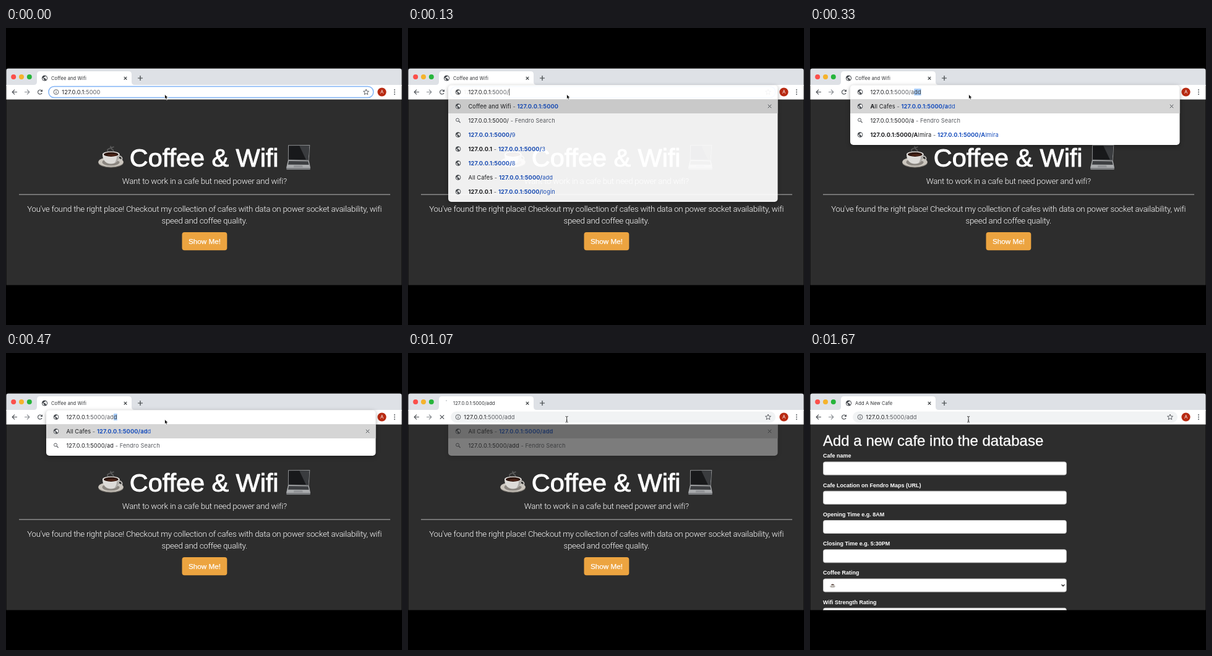
Write an HTML page with a canvas that moves like this. It is 640 px wide and 480 px high and loops after 1730 ms.

```html
<!DOCTYPE html>
<html lang="en">
<head>
<meta charset="utf-8">
<title>Coffee and Wifi</title>
<style>
html, body { margin: 0; width: 100%; height: 100%; overflow: hidden; background: #000; }
canvas { display: block; }
</style>
</head>
<body>
<canvas id="stage" width="640" height="480"></canvas>
<script>
const LOOP = 1730;
const UI = 'Inter, Roboto, sans-serif';
const PAGE = '"Liberation Sans", Arial, sans-serif';
const THIN = 'Roboto, "Liberation Sans", sans-serif';
const INK = '#1b1c1f', GRAY = '#585b60', BLUE = '#1a50bd', DARK = '#2d2d2d';

const main = document.getElementById('stage').getContext('2d');
const layer = document.createElement('canvas');
layer.width = 640;
layer.height = 480;
const over = layer.getContext('2d');
let c = main;

// ---- helpers ----
function box(x, y, w, h, r, fill, stroke, lw = 1) {
  c.beginPath();
  c.roundRect(x, y, w, h, r);
  if (fill) { c.fillStyle = fill; c.fill(); }
  if (stroke) { c.strokeStyle = stroke; c.lineWidth = lw; c.stroke(); }
}
function oval(x, y, rx, ry, fill, stroke, lw = 1) {
  c.beginPath();
  c.ellipse(x, y, rx, ry, 0, 0, 7);
  if (fill) { c.fillStyle = fill; c.fill(); }
  if (stroke) { c.strokeStyle = stroke; c.lineWidth = lw; c.stroke(); }
}
function poly(fill, ...p) {
  c.beginPath();
  for (let i = 0; i < p.length; i += 2) c.lineTo(p[i], p[i + 1]);
  c.closePath();
  c.fillStyle = fill;
  c.fill();
}
function path(d, x, y, stroke, lw = 1, fill) {
  const p = new Path2D(d);
  c.save();
  c.translate(x, y);
  if (fill) { c.fillStyle = fill; c.fill(p); }
  if (stroke) { c.strokeStyle = stroke; c.lineWidth = lw; c.stroke(p); }
  c.restore();
}
function text(s, x, y, font, color, align = 'left', track = 0, bolder = 0) {
  c.font = font;
  c.fillStyle = color;
  c.textAlign = align;
  c.letterSpacing = track + 'px';
  c.fillText(s, x, y);
  if (bolder) {
    c.strokeStyle = color;
    c.lineWidth = bolder;
    c.lineJoin = 'round';
    c.strokeText(s, x, y);
  }
  const w = c.measureText(s).width;
  c.letterSpacing = '0px';
  return w;
}
// Consecutive pieces: [string, color, weight]
function runs(list, x, y) {
  for (const [s, color, weight = 400] of list)
    x += text(s, x, y, `${weight} 9.2px ${UI}`, color, 'left', .12);
  return x;
}
const cross = (x, y, r, lw, color) =>
  path(`M${-r} ${-r}L${r} ${r}M${r} ${-r}L${-r} ${r}`, x, y, color, lw);

// ---- icons ----
function globe(x, y, r) {
  oval(x, y, r, r, '#43474c');
  c.save();
  c.translate(x, y);
  c.scale(r / 10, r / 10);
  path('M-1 8C-5 7.5 -8 4 -8 0L-7.8 -1.8L-3 3V4Q-3 6 -1 6Z', 0, 0, null, 0, '#fff');
  path('M6 5.4Q5.4 4 4 4H3V1Q3 0 2 0H-4V-2H-2Q-1 -2 -1 -3V-5H1Q3 -5 3 -7.4Q8 -5 8 0Q8 3.2 6 5.4Z', 0, 0, null, 0, '#fff');
  c.restore();
}
function lens(x, y) {
  oval(x - 1, y - 1, 2.5, 2.5, null, GRAY);
  path('M1 1L3.6 3.6', x, y, GRAY, 1.2);
}
function arrow(x, y, dir, color) {
  path(`M${4 * dir} 0H${-3.6 * dir}M0 -3.8L${-3.8 * dir} 0L0 3.8`, x, y, color, 1.2);
}
function reload(x, y) {
  c.beginPath();
  c.arc(x, y, 3.4, 0.5, 5.5);
  c.strokeStyle = '#4d5156';
  c.lineWidth = 1.2;
  c.stroke();
  poly('#4d5156', x + 4, y - 4.2, x + 4, y - .4, x + .3, y - .4);
}
function star(x, y) {
  c.beginPath();
  for (let i = 0; i < 10; i++) {
    const a = i * Math.PI / 5 - Math.PI / 2, r = i % 2 ? 2.1 : 4.7;
    c.lineTo(x + r * Math.cos(a), y + r * Math.sin(a));
  }
  c.closePath();
  c.strokeStyle = '#4d5156';
  c.lineWidth = .9;
  c.stroke();
}
function cup(x, y, k) {
  c.save();
  c.translate(x, y);
  c.scale(k, k);
  oval(0, 7.5, 20.3, 8.3, '#85807a');
  oval(0, 6.5, 20.2, 7.8, '#cbc6be');
  oval(0, 7, 14, 5.5, '#8b8680');
  oval(14, 1, 4, 3.8, null, '#c8c5c0', 1.8);
  path('M-13.5 -6C-13.5 4 -8 9.5 0 9.5C8 9.5 14 4 14 -6Z', 0, 0, null, 0, '#dddbd8');
  path('M6 8C11 6 14 1 14 -6L9.5 -3C9.5 2 8 5 6 8Z', 0, 0, null, 0, '#aeaba7');
  oval(.3, -6, 13.7, 4.6, '#efedea');
  oval(.3, -5.7, 12, 3.6, '#2e1710');
  oval(2, -4.6, 7.5, 1.7, '#4d2518');
  path('M-4 -10Q-8 -13 -3 -15T-1 -19M2 -9Q6 -12 2 -14T5 -18', 0, 0, 'rgba(140,140,140,.5)', 1.6);
  c.restore();
}
function laptop() {
  poly('#8f9193', 456, 189.3, 491.3, 189, 489.6, 214.5, 455.8, 214);
  poly('#18191b', 457, 190.3, 490.2, 190, 488.6, 213.3, 456.8, 212.8);
  poly('#3a3c3f', 474, 190.1, 490.2, 190, 488.6, 213.3, 485, 213.2);
  poly('#a9abad', 455.8, 214, 489.6, 214.5, 492, 226, 453, 226);
  poly('#3d3f42', 457, 215, 488.3, 215.4, 489.6, 221, 455.8, 220.8);
  poly('#929497', 465.5, 222, 479, 222, 479.8, 225.3, 464.8, 225.3);
  poly('#7d7f82', 453, 226, 492, 226, 491.5, 229, 453.5, 229);
}

// ---- pages ----
function home() {
  cup(169.5, 210, 1);
  text('Coffee & Wifi', 199.8, 224.4, `41.4px ${PAGE}`, '#fff', 'left', 0, 1);
  laptop();
  const lead = (s, y) => text(s, 320.7, y, `300 13.3px ${THIN}`, '#fff', 'center', -.24);
  lead('Want to work in a cafe but need power and wifi?', 251.5);
  c.fillStyle = '#b8b8b8';
  c.fillRect(21, 268.6, 600, 1);
  lead("You've found the right place! Checkout my collection of cafes with data on power socket availability, wifi", 297);
  lead('speed and coffee quality.', 316.3);
  box(284.5, 330, 72.8, 29.2, 4, '#eca440');
  text('Show Me!', 321, 348.7, `11.7px ${PAGE}`, '#fff', 'center', 0, .25);
}
function form() {
  text('Add a new cafe into the database', 21, 149.8, `24px ${PAGE}`, '#fff', 'left', 0, .3);
  const labels = ['Cafe name', 'Cafe Location on Fendro Maps (URL)', 'Opening Time e.g. 8AM',
    'Closing Time e.g. 5:30PM', 'Coffee Rating', 'Wifi Strength Rating'];
  labels.forEach((s, i) => {
    const y = 47.25 * i;
    text(s, 21, 169.3 + y, `bold 9px ${PAGE}`, '#fff');
    box(21.5, 176 + y, 392.8, 21, 3, '#fff', '#c4c4c4');
  });
  cup(36.5, 375.7, .2);
  path('M-2.4 -1.2L0 1.3L2.4 -1.2', 409, 375.5, '#222', 1.3);
}

// ---- browser ----
function chrome(s) {
  box(0, 65.5, 640, 28, [4, 4, 0, 0], '#dee1e6');
  c.fillStyle = '#fff';
  c.fillRect(0, 92, 640, 23.5);
  [['#fb4f4a', 12.2], ['#f5b32c', 25], ['#27b53b', 37.8]].forEach(([col, x]) => oval(x, 79, 4, 4, col));
  path('M45 92Q50 92 50 87V75Q50 70 55 70H198Q203 70 203 75V87Q203 92 208 92Z', 0, 0, null, 0, '#fff');
  if (s.loading) oval(62, 77, .8, .8, '#9aa0a6');
  else globe(62.5, 81, 4.6);
  text(s.tab, 73, 83.7, `7.5px ${UI}`, '#2c2e31', 'left', .12);
  cross(193, 81.2, 2.3, 1.1, '#3c4043');
  path('M-4 0H4M0 -4V4', 217, 81, '#3c4043', 1.2);

  arrow(14, 103.5, 1, '#4d5156');
  arrow(34, 103.5, -1, '#8a8e93');
  if (s.loading) cross(55, 103.5, 3.2, 1.2, '#4d5156');
  else reload(55, 103.5);
  if (s.focus) box(68.9, 94.4, 524.9, 18.2, 9, '#fff', '#7fb2f5', 1.5);
  else box(69, 94.5, 525, 18, 9, '#f1f3f4');
  oval(81, 103.5, 3.9, 3.9, null, '#4d5156', .9);
  path('M0 -.5V2.1M0 -2.1V-1.1', 81, 103.5, '#4d5156', 1);
  runs([['127.0.0.1', INK], [':5000' + s.path, GRAY]], 90.3, 106.8);
  star(582, 103.7);
  oval(607.5, 103.5, 7.1, 7.1, '#b82a12');
  text('A', 607.5, 106.3, `7.6px ${UI}`, '#fff', 'center');
  [100, 103.5, 107].forEach(y => oval(628, y, .95, .95, '#4d5156'));
}

// ---- suggestions ----
const HOST = '127.0.0.1', BASE = HOST + ':5000/';
const dash = [' - ', GRAY];
const link = (bold, rest = '') => [[bold, BLUE, 700], [rest, BLUE]];
const search = q => ({ find: true, list: [[BASE + q, INK], [' - Fendro Search', GRAY]] });
const row = (...list) => ({ list });

const ROOT = [
  row(['Coffee and Wifi', INK], dash, ...link(HOST + ':5000')),
  search(''),
  row(...link(BASE, '9')),
  row([HOST, INK, 700], dash, ...link(BASE, '3')),
  row(...link(BASE, '8')),
  row(['All Cafes', INK], dash, ...link(BASE, 'add')),
  row([HOST, INK, 700], dash, ...link(BASE, 'login'))
];
const ONE = [
  row(['A', INK, 700], ['ll Cafes', INK], dash, ...link(BASE + 'a', 'dd')),
  search('a'),
  row([BASE + 'A', INK, 700], ['lmira', INK], dash, ...link(BASE + 'A', 'lmira'))
];
const TWO = [row(['All Cafes', INK], dash, ...link(BASE + 'ad', 'd')), search('ad')];
const FULL = [row(['All Cafes', INK], dash, ...link(BASE + 'add')), search('add')];

function popup({ rows, typed = '', hint = '', alpha = 1, closing }) {
  c = over;
  c.clearRect(0, 0, 640, 480);
  c.save();
  c.shadowColor = 'rgba(0,0,0,.35)';
  c.shadowBlur = 7;
  c.shadowOffsetY = 2;
  box(65, 92.5, 532.5, 27.5 + 23 * rows.length, 5, '#fff');
  c.restore();
  globe(81, 103.5, 4.3);
  let x = runs([[HOST, INK], [':5000/' + typed, GRAY]], 97.5, 106.8);
  if (hint) {
    c.fillStyle = '#a6cbf8';
    c.fillRect(x, 98, c.measureText(hint).width, 11);
    runs([[hint, '#3c4043']], x, 106.8);
  } else {
    c.fillStyle = '#222';
    c.fillRect(x + .3, 98, .8, 11);
  }
  c.fillStyle = '#d5d5d5';
  c.fillRect(65, 115, 532.5, 23);
  rows.forEach((r, i) => {
    const y = 126.5 + 23 * i;
    if (r.find) lens(81, y);
    else globe(81, y, 4.3);
    runs(r.list, 97.5, y + 3.2);
  });
  cross(584.5, 126.5, 2.7, 1, '#4d5156');

  c = main;
  c.save();
  if (closing) {
    c.beginPath();
    c.rect(0, 115.5, 640, 300);
    c.clip();
  }
  c.globalAlpha = alpha;
  c.drawImage(layer, 0, 0);
  c.restore();
}

// ---- pointers ----
function pointer() {
  path('M0 0V8L1.9 6.4L3.1 9.2L4.6 8.5L3.4 5.8H5.8Z', 256.4, 107, '#fff', .9, '#111');
}
function beam(x) {
  path('M-2 -4.7Q0 -4.7 0 -3.6Q0 -4.7 2 -4.7M0 -3.8V3.8M-2 4.7Q0 4.7 0 3.6Q0 4.7 2 4.7M-1 1.6H1', x, 107.2, '#222', .9);
}

// ---- timeline ----
const start = { tab: 'Coffee and Wifi', path: '', focus: true, page: home };
const added = { tab: 'Add A New Cafe', path: '/add', page: form, beam: 256.6 };
const STEPS = [
  [0, start],
  [70, { ...start, pop: { rows: ROOT, alpha: .5 } }],
  [130, { ...start, pop: { rows: ROOT, alpha: .93 } }],
  [200, { ...start, pop: { rows: ROOT } }],
  [330, { ...start, pop: { rows: ONE, typed: 'a', hint: 'dd' } }],
  [470, { ...start, pop: { rows: TWO, typed: 'ad', hint: 'd' } }],
  [600, { ...start, pop: { rows: FULL, typed: 'add' } }],
  [1070, { tab: BASE + 'add', path: '/add', page: home, loading: true, beam: 256.6,
    pop: { rows: FULL, typed: 'add', alpha: .38, closing: true } }],
  [1130, added],
  [1670, { ...added, beam: 256.1 }]
];

function draw(s) {
  c.fillStyle = '#000';
  c.fillRect(0, 0, 640, 480);
  c.save();
  c.beginPath();
  c.rect(.5, 65, 639, 350.5);
  c.clip();
  c.fillStyle = DARK;
  c.fillRect(0, 115, 640, 301);
  s.page();
  chrome(s);
  if (s.pop) popup(s.pop);
  if (s.beam) beam(s.beam);
  else pointer();
  c.restore();
}

function tick() {
  const t = performance.now() % LOOP;
  draw(STEPS.findLast(([at]) => at <= t)[1]);
  requestAnimationFrame(tick);
}
tick();
</script>
</body>
</html>
```
